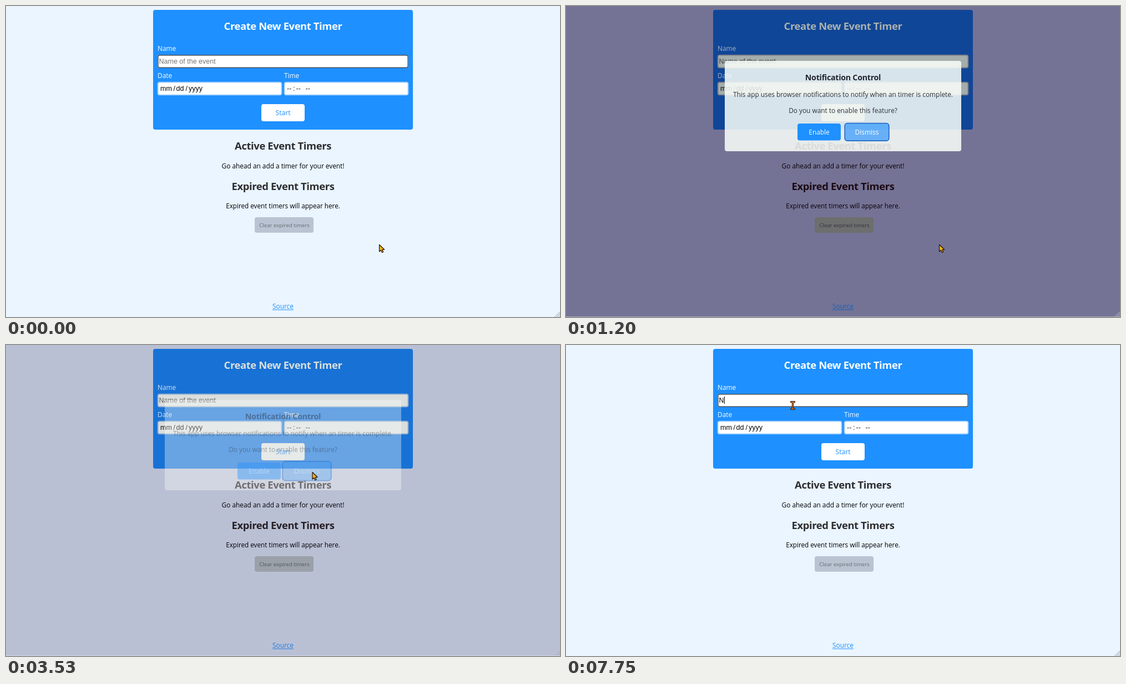
An HTML page with a canvas for the animation above (8 s loop, 998 px wide and 561 px high).

```html
<!DOCTYPE html>
<html lang="en">
<head>
<meta charset="utf-8">
<title>Event Timer</title>
<style>
html, body { margin: 0; width: 100%; height: 100%; overflow: hidden; background: #eaf5ff; }
canvas { display: block; width: 998px; height: 561px; }
</style>
</head>
<body>
<canvas id="stage" width="998" height="561"></canvas>
<script>
const W = 998, H = 561, LOOP = 8000, BLUE = '#1e90ff';
const UI = '"Open Sans", "Noto Sans", sans-serif';
const FIELD = '"Liberation Sans", Arial, sans-serif';
const c = document.getElementById('stage').getContext('2d');

// Each tone is [normal, dimmed behind the dialog]
const TONES = {
  bg: ['#eaf5ff', '#747294'],
  panel: [BLUE, '#104696'],
  title: ['#ffffff', '#aab1ae'],
  label: ['#ffffff', '#a6b1be'],
  fill: ['#ffffff', '#a4aeab'],
  edge: ['#a2d1ff', '#7b7b82'],
  hint: ['#757575', '#46434c'],
  ink: ['#000000', '#080008'],
  dash: ['#222222', '#17121c'],
  heading: ['#2d2d30', '#1c0a14'],
  clear: ['#b9c3d2', '#6d6e6d'],
  clearText: ['#696d74', '#37323c'],
  link: [BLUE, '#1360b4'],
  grip: ['#8d9299', '#c3c8cc']
};

const clamp = v => Math.max(0, Math.min(1, v));
const span = (t, a, b) => clamp((t - a) / (b - a));
const smooth = p => p * p * (3 - 2 * p);
const lerp = (a, b, p) => a + (b - a) * p;

// CSS "ease": cubic-bezier(.25, .1, .25, 1)
function ease(p) {
  if (p <= 0 || p >= 1) return clamp(p);
  let lo = 0, hi = 1, u = 0.5;
  for (let i = 0; i < 22; i++) {
    u = (lo + hi) / 2;
    const x = 0.75 * u * (1 - u) + u * u * u;
    if (x < p) lo = u; else hi = u;
  }
  return 0.3 * u * (1 - u) * (1 - u) + 3 * u * u * (1 - u) + u * u * u;
}

function mix(a, b, k) {
  const ch = (s, i) => parseInt(s.slice(i, i + 2), 16);
  return 'rgb(' + [1, 3, 5].map(i => Math.round(lerp(ch(a, i), ch(b, i), k))).join(',') + ')';
}

function palette(k) {
  const out = {};
  for (const name in TONES) out[name] = mix(...TONES[name], k);
  return out;
}

function box(x0, y0, x1, y1, r, fill) {
  c.beginPath();
  c.roundRect(x0, y0, x1 - x0, y1 - y0, r);
  c.fillStyle = fill;
  c.fill();
}

function text(s, x, y, size, color, o = {}) {
  c.font = (o.weight || 400) + ' ' + size + 'px ' + (o.font || UI);
  c.letterSpacing = (o.track || 0) + 'px';
  c.textAlign = o.align || 'center';
  c.fillStyle = color;
  c.fillText(s, x, y);
}

const title = (s, y, color) => text(s, 499, y, 18.4, color, { weight: 700, track: -0.38 });
const left = (s, x, y, color) => text(s, x, y, 11.85, color, { align: 'left' });
const field = (s, x, y, color) => text(s, x, y, 12.5, color, { align: 'left', font: FIELD });

function input(x0, y0, x1, y1, p, focused) {
  if (focused) {
    box(x0, y0, x1, y1, 3, '#9fcbf5');
    box(x0 + 0.5, y0 + 0.3, x1 - 0.5, y1 - 0.3, 3, '#26313d');
  } else {
    box(x0 - 0.3, y0 - 0.3, x1 + 0.3, y1 + 0.3, 4, p.edge);
  }
  box(x0 + 1.6, y0 + 1.6, x1 - 1.6, y1 - 1.6, 2, p.fill);
}

function caretOn(t) {
  const on = [[70, 590], [3890, 4420], [4950, 5480], [6010, 6620], [6950, 7480], [7750, 8000]];
  return on.some(([a, b]) => t >= a && t < b);
}

function page(t, k) {
  const p = palette(k);
  const focused = t < 730 || t >= 3890;
  const typed = t >= 7750;
  const empty = t >= 730 && t < 930;
  const dy = empty ? -32 : 0;

  c.fillStyle = p.bg;
  c.fillRect(0, 0, W, H);
  box(265, 7, 733, 223, 4, p.panel);
  title('Create New Event Timer', 43, p.title);
  left('Name', 273, 80.5, p.label);
  left('Date', 273, 129.5, p.label);
  left('Time', 501, 129.5, p.label);

  input(273, 88, 725, 112, p, focused);
  if (typed) field('N', 275.5, 104, '#000000');
  else field('Name of the event', 275.5, 104, p.hint);
  if (caretOn(t)) {
    c.fillStyle = '#000000';
    c.fillRect(typed ? 285 : 276, 93, 1, 13);
  }

  input(273, 137, 497, 161, p);
  [['mm', 278], ['/', 301.5], ['dd', 306.5], ['/', 323.5], ['yyyy', 329]]
    .forEach(([s, x]) => field(s, x, 153, p.ink));
  input(501, 137, 725, 161, p);
  [['--', 506], [':', 517], ['--', 522.5], ['--', 539.5]]
    .forEach(([s, x]) => field(s, x, 153, p.dash));

  box(460, 177, 538, 208, 4, p.fill);
  text('Start', 499, 197, 12.1, p.link);

  title('Active Event Timers', 259, p.heading);
  if (!empty) text('Go ahead an add a timer for your event!', 499, 292.5, 11.85, p.ink);
  title('Expired Event Timers', 332 + dy, p.heading);
  text('Expired event timers will appear here.', 499, 365 + dy, 11.7, p.ink);
  box(448, 381 + dy, 554, 409 + dy, 4, p.clear);
  text('Clear expired timers', 501.5, 398.8 + dy, 9.63, p.clearText);

  text('Source', 499, 546, 11.85, p.link);
  c.fillRect(480, 547.5, 38, 1);

  c.strokeStyle = p.grip;
  c.lineWidth = 1;
  for (const d of [9.5, 6, 2.5]) {
    c.beginPath();
    c.moveTo(W - d, H);
    c.lineTo(W, H - d);
    c.stroke();
  }
  if (k > 0) {
    c.fillStyle = mix('#eaf5ff', '#a9aabd', k);
    c.fillRect(0, H - 1, W, 1);
  }
}

function dialog(t, k) {
  if (k <= 0) return;
  c.save();
  c.globalAlpha = k;
  box(286, 99, 712, 262, 4, 'rgba(251,255,251,0.86)');
  text('Notification Control', 499, 134, 14.2, '#20242f', { weight: 700, track: -0.25 });
  text('This app uses browser notifications to notify when an timer is complete.',
    499, 164, 11.85, '#2b3138');
  text('Do you want to enable this feature?', 499, 192.5, 11.85, '#2b3138');
  box(417, 212, 495, 242.5, 4, BLUE);
  text('Enable', 456, 232, 11.85, '#ffffff');

  const grow = 1 + 0.1 * ease(span(t, 2560, 2790));
  c.translate(542, 227.3);
  c.scale(grow, grow);
  box(-39.5, -15.5, 39.5, 15.5, 4, 'rgba(30,144,255,0.64)');
  c.beginPath();
  c.roundRect(-39.8, -15.8, 79.6, 31.6, 4.5);
  c.strokeStyle = '#1b66c4';
  c.lineWidth = 1.6;
  c.stroke();
  text('Dismiss', 0, 4.6, 11.9, '#ffffff');
  c.restore();
}

function bar(t) {
  const s = ease(span(t, 3810, 4160)) - ease(span(t, 5790, 6140));
  if (s < 0.01) return;
  c.save();
  c.scale(1, s);
  c.shadowColor = 'rgba(0,0,0,0.55)';
  c.shadowBlur = 5;
  c.shadowOffsetY = 2;
  c.fillStyle = BLUE;
  c.fillRect(-10, 0, W + 20, 43);
  c.shadowColor = 'transparent';
  left('Notifications are disabled.', 7, 26.3, '#ffffff');
  box(885, 7, 930, 35, 3, '#ffffff');
  text('Enable', 907.5, 24.7, 9.63, BLUE);
  const lift = -1.5 * (ease(span(t, 5540, 5720)) - ease(span(t, 6010, 6140)));
  box(938, 7 + lift, 987, 35 + lift, 3, '#eaf3f6');
  text('Dismiss', 962.5, 24.7 + lift, 9.7, '#41647f');
  c.restore();
}

function shape(points, fill, line) {
  c.beginPath();
  points.forEach(([x, y], i) => i ? c.lineTo(x, y) : c.moveTo(x, y));
  c.closePath();
  c.fillStyle = fill;
  c.fill();
  c.strokeStyle = '#1d1408';
  c.lineWidth = line;
  c.lineJoin = 'round';
  c.stroke();
}

const ARROW = [[0, 0], [0, 12.5], [2.9, 10], [5, 14.2], [7.1, 13.2], [5.2, 9.2], [9, 8.8]];
const HAND = [[-1.3, 0.6], [0, -0.3], [1.2, 0.6], [1.6, 5], [3.6, 5], [5.6, 5.8], [7.4, 7],
  [7.4, 11], [6, 13.5], [5.8, 15.2], [-0.6, 15.2], [-1.2, 13.2], [-4.2, 9.6], [-3.6, 8.2], [-1, 9.4]];
const BEAM = [[-4, -7.5], [4, -7.5], [4, -5.3], [1.2, -5.3], [1.2, 5.3], [4, 5.3], [4, 7.5],
  [-4, 7.5], [-4, 5.3], [-1.2, 5.3], [-1.2, -5.3], [-4, -5.3]];

const MOVES = [
  [1940, 2720, 552, 229.5],
  [4950, 5720, 956, 29],
  [6010, 6490, 411, 109.5],
  [6620, 6880, 408.5, 109]
];

function cursor(t, k) {
  let x = 672.5, y = 430.5;
  for (const [a, b, tx, ty] of MOVES) {
    const p = smooth(span(t, a, b));
    x = lerp(x, tx, p);
    y = lerp(y, ty, p);
  }
  const inside = (x0, y0, x1, y1) => x > x0 && x < x1 && y > y0 && y < y1;
  const onDialog = k > 0.5 && inside(501, 211, 584, 244);
  const onBar = t > 4160 && t < 6080 && inside(885, 5, 987, 35) && !inside(930, 5, 938, 35);
  const onInput = t > 6010 && inside(273, 88, 725, 112);
  c.save();
  c.translate(x, y);
  if (onInput) shape(BEAM, '#d9752b', 0.9);
  else if (onDialog || onBar) {
    shape(HAND, '#ffb31a', 1.3);
    c.beginPath();
    for (const fx of [1.6, 3.6, 5.6]) {
      c.moveTo(fx, 5.2);
      c.lineTo(fx, 8.2);
    }
    c.lineWidth = 0.8;
    c.stroke();
  } else shape(ARROW, '#fbb01c', 1.2);
  c.restore();
}

function draw(t) {
  const k = ease(span(t, 930, 1230)) * (1 - ease(span(t, 3400, 3780)));
  page(t, k);
  dialog(t, k);
  bar(t);
  cursor(t, k);
}

const start = performance.now();
function tick() {
  draw((performance.now() - start) % LOOP);
  requestAnimationFrame(tick);
}
tick();
</script>
</body>
</html>
```
